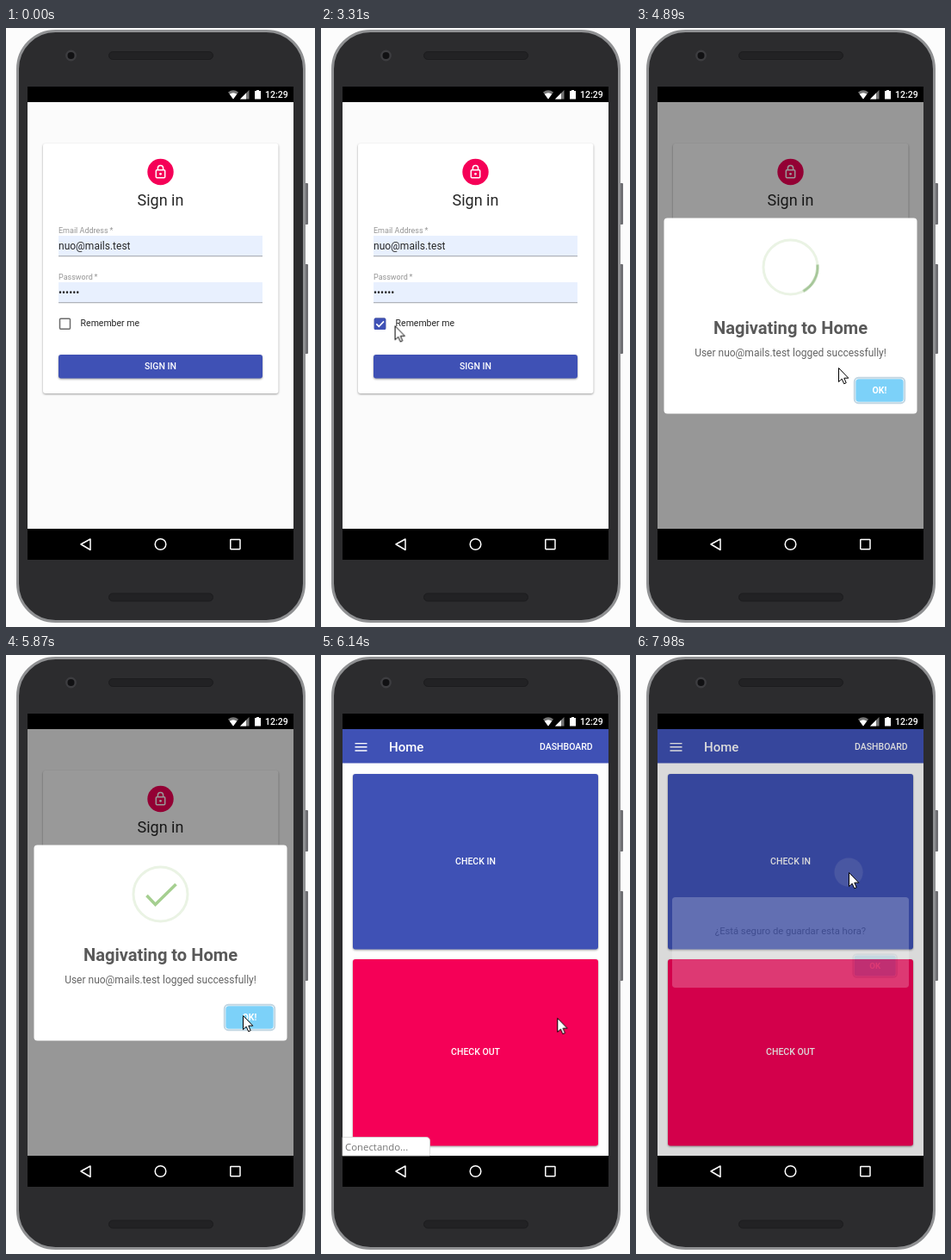
These frames come from a looping animation (359 px wide and 695 px high, 8000 ms). An HTML page:

```html
<!DOCTYPE html>
<html lang="en">
<head>
<meta charset="utf-8">
<title>Sign in flow</title>
<style>
  html, body { margin: 0; width: 100%; height: 100%; overflow: hidden; background: #fcfcfc; }
  svg { display: block; font: 12px Roboto, sans-serif; }
  .mid { text-anchor: middle; }
  .btn { font-size: 10.5px; font-weight: 500; fill: #fff; }
  .label { font-size: 9px; fill: #949494; }
  .field { fill: #e8f0fe; }
  .ink { fill: #262626; }
  .line { fill: none; stroke: #fff; }
  .raised { filter: drop-shadow(0 1px 1.2px rgba(0,0,0,.38)); }
  .dialog { transform-origin: 179.5px 333.5px; }
  #arc { transform-origin: 179.5px 277.5px; }
  .soft { fill: #646464; }
  .ripple { fill: #fff; }
</style>
</head>
<body>
<svg width="359" height="695" viewBox="0 0 359 695">
  <defs>
    <clipPath id="signClip"><rect x="61" y="379" width="237" height="27.5" rx="3"/></clipPath>
    <clipPath id="inClip"><rect x="37" y="138" width="285" height="203.5" rx="3"/></clipPath>
  </defs>

  <!-- phone -->
  <g fill="#6f6f73">
    <rect x="346" y="180" width="5" height="48" rx="1"/>
    <rect x="346" y="274" width="5" height="104" rx="1"/>
  </g>
  <rect x="13.5" y="3.5" width="333" height="685" rx="44" fill="#2c2c2e" stroke="#8f9092" stroke-width="3"/>
  <g fill="#222224" stroke="#1c1c1e">
    <rect x="119.5" y="27.5" width="121" height="9" rx="4.5"/>
    <rect x="119.5" y="656" width="121" height="9" rx="4.5"/>
  </g>
  <circle cx="75.5" cy="32" r="5.2" fill="#111113" stroke="#3d3d40" stroke-width="2.4"/>
  <rect x="25" y="68" width="309" height="549"/>

  <!-- status bar -->
  <g fill="#fff">
    <path d="M258 74.6Q264 70 270 74.6L264 82.5Z" fill="#777"/>
    <path d="M259.8 76.8Q264 73.6 268.2 76.8L264 82.5Z"/>
    <path d="M282.5 72V82.5H272Z" fill="#777"/>
    <path d="M279 75.5V82.5H272Z"/>
    <path d="M289 73H291V72H294V73H296V82.5H289Z"/>
    <text x="301" y="81" font-size="10.5" font-weight="500">12:29</text>
  </g>

  <!-- navigation bar -->
  <g class="line" stroke-width="1.5" stroke-linejoin="round">
    <path d="M87 599L98 593V605.5Z"/>
    <circle cx="179.5" cy="599" r="6.3"/>
    <rect x="260.8" y="593.5" width="11.2" height="11.2" rx=".6"/>
  </g>

  <rect x="25" y="86" width="309" height="495" fill="#fbfbfb"/>

  <g id="login">
    <rect class="raised" x="43" y="134" width="273.5" height="290" rx="3" fill="#fff"/>
    <circle cx="179.5" cy="167" r="15.2" fill="#f50057"/>
    <g class="line" stroke-width="1.5">
      <rect x="174.3" y="164.8" width="10.4" height="9" rx="1"/>
      <path d="M176.4 164.5V162.6A3.1 3.1 0 0 1 182.6 162.6V164.5"/>
    </g>
    <circle cx="179.5" cy="169.3" r="1.4" fill="#fff"/>
    <text class="mid ink" x="179.5" y="206" font-size="18">Sign in</text>

    <text class="label" x="61" y="238.3">Email Address&#8201;*</text>
    <rect class="field" x="61" y="241" width="237" height="23.5"/>
    <rect x="61" y="264.2" width="237" height="1" fill="#a0a3ab"/>
    <text class="ink" x="61" y="257">nuo@mails.test</text>

    <text class="label" x="61" y="292.3">Password&#8201;*</text>
    <rect class="field" x="61" y="295" width="237" height="23.5"/>
    <rect x="61" y="318.2" width="237" height="1" fill="#a0a3ab"/>
    <text class="ink" x="61" y="311">••••••</text>

    <rect x="62.5" y="337.2" width="12" height="12" rx="1" fill="#fff" stroke="#6b6b6b" stroke-width="1.5"/>
    <g id="tick">
      <rect x="61.7" y="336.4" width="13.6" height="13.6" rx="1.5" fill="#3f51b5"/>
      <path class="line" d="M64.3 343.4L67.3 346.4L73 340.4" stroke-width="1.6"/>
    </g>
    <text x="86.6" y="346.3" class="ink" font-size="10.5">Remember me</text>

    <rect class="raised" x="61" y="379" width="237" height="27.5" rx="3" fill="#3f51b5"/>
    <g clip-path="url(#signClip)"><circle id="rippleA" class="ripple" cx="235" cy="394" r="7"/></g>
    <text class="mid btn" x="179.5" y="396.4">SIGN IN</text>
  </g>

  <g id="home">
    <rect x="25" y="86" width="309" height="495" fill="#fefefe"/>
    <rect x="25" y="86" width="309" height="39.5" fill="#3f51b5"/>
    <path class="line" d="M39.5 102.6H53.5M39.5 106.8H53.5M39.5 111H53.5" stroke-width="1.4"/>
    <text x="79" y="112" font-size="15" font-weight="500" fill="#fff">Home</text>
    <text class="btn" x="254" y="110">DASHBOARD</text>
    <rect class="raised" x="37" y="138" width="285" height="203.5" rx="3" fill="#3f51b5"/>
    <rect class="raised" x="37" y="353" width="285" height="216.5" rx="3" fill="#f50057"/>
    <g clip-path="url(#inClip)"><circle id="rippleB" class="ripple" cx="247" cy="252" r="16.5"/></g>
    <text class="mid btn" x="179.5" y="243">CHECK IN</text>
    <text class="mid btn" x="179.5" y="464">CHECK OUT</text>
  </g>

  <rect id="shade" x="25" y="86" width="309" height="495"/>

  <g id="welcome" class="dialog">
    <rect x="32.5" y="220.5" width="294" height="227" rx="4" fill="#fff"/>
    <g fill="none" stroke-width="3">
      <circle cx="179.5" cy="277.5" r="31.5" stroke="#eaf3e4"/>
      <circle id="arc" cx="179.5" cy="277.5" r="31.5" stroke="#a5c698" pathLength="360"/>
      <path id="check" d="M163.5 279L173.5 289.5L197.5 266" stroke="#a5cf90" stroke-width="3.6" pathLength="100"/>
    </g>
    <text class="mid" x="179.5" y="355" font-size="20.1" font-weight="700" fill="#595959">Nagivating to Home</text>
    <text class="mid soft" x="179.5" y="380.5">User nuo@mails.test logged successfully!</text>
    <rect x="253.8" y="405.8" width="58.4" height="29.4" rx="4.5" fill="none" stroke="#c2d6e2" stroke-width="2"/>
    <rect x="255.3" y="407.3" width="55.4" height="26.4" rx="3.5" fill="#7cd1f9"/>
    <text class="mid btn" x="283" y="424.2" style="font-weight:700">OK!</text>
  </g>

  <g id="confirm" class="dialog">
    <rect x="32.5" y="277.5" width="294" height="112" rx="4" fill="#fff"/>
    <text class="mid soft" x="179.5" y="323">¿Está seguro de guardar esta hora?</text>
    <rect x="257.3" y="348" width="54.4" height="28.6" rx="4.5" fill="none" stroke="#c2d6e2" stroke-width="2"/>
    <rect x="258.8" y="349.5" width="51.4" height="25.6" rx="3.5" fill="#7cd1f9"/>
    <text class="mid btn" x="284.5" y="366.3" style="font-weight:700">OK</text>
  </g>

  <g id="status">
    <path d="M25 559.5H122Q126.5 559.5 126.5 564V581H25Z" fill="#fff" stroke="#d4d4d4" stroke-width=".8"/>
    <text x="28" y="575" fill="#757575" style="font:11.4px 'Open Sans',sans-serif">Conectando...</text>
  </g>

  <path id="cursor" d="M.5 .5V16.6L4.2 13.2L6.7 18.8L9.2 17.7L6.8 12.2H11.8Z" fill="#fff" stroke="#000"/>
</svg>

<script>
const LOOP = 8000;
const $ = id => document.getElementById(id);

// steps: [ms, value, easing to the next step]
function play(id, prop, steps) {
  const last = steps[steps.length - 1];
  const all = [[0, steps[0][1]], ...steps, [LOOP, last[1]]];
  $(id).animate(
    all.map(([ms, value, easing = 'linear']) => ({ offset: ms / LOOP, [prop]: value, easing })),
    { duration: LOOP, iterations: Infinity });
}

// visible between two times, with hard edges
function show(id, from, to = LOOP) {
  const steps = [];
  if (from > 0) steps.push([0, 0], [from, 0]);
  steps.push([from, 1], [to, 1]);
  if (to < LOOP) steps.push([to, 0]);
  play(id, 'opacity', steps);
}

const at = (x, y) => `translate(${x}px, ${y}px)`;
const scale = k => `scale(${k})`;
const turn = a => `rotate(${a}deg)`;

play('cursor', 'transform', [
  [1120, at(264, 695)], [1260, at(247, 664)], [1480, at(178, 575)],
  [1680, at(141, 441)], [1800, at(127, 402), 'ease-out'], [1940, at(121, 386)],
  [1960, at(121, 386), 'ease-in-out'], [2280, at(79, 342)],
  [3230, at(79, 342), 'ease-in'], [3520, at(136, 370)], [3740, at(198, 397), 'ease-out'],
  [3890, at(230, 400)], [4010, at(235, 394)],
  [5230, at(235, 394), 'ease-in-out'], [5620, at(275, 418)],
  [6060, at(275, 418), 'ease-in-out'], [6300, at(272, 430)],
  [7090, at(272, 430), 'ease-in-out'], [7530, at(247, 252)]
]);
show('cursor', 1140);

show('login', 0, 5890);
show('home', 5890);
show('status', 5940, 6470);
play('tick', 'opacity', [[2640, 0], [2740, 1]]);

const ripple = (id, x, y, sizes, fades) => {
  $(id).style.transformOrigin = `${x}px ${y}px`;
  play(id, 'transform', sizes.map(([ms, k]) => [ms, scale(k)]));
  play(id, 'opacity', fades);
};
ripple('rippleA', 235, 394, [[4520, 0], [4610, 1], [4900, 20]],
  [[4520, 0], [4540, .1], [4650, .12], [4900, 0]]);
ripple('rippleB', 247, 252, [[7800, 0], [7980, 1], [8000, 1.15]],
  [[7800, 0], [7830, .12], [8000, .12]]);

play('shade', 'opacity', [
  [4600, 0], [4860, .4], [5890, .4], [5990, .26], [6045, 0],
  [7890, 0], [7980, .14], [8000, .18]
]);

play('welcome', 'opacity', [[4600, 0], [4760, 1], [5890, 1], [5990, .28], [6045, 0]]);
play('welcome', 'transform', [
  [4600, scale(.5), 'ease'], [4735, scale(1.05), 'ease'], [4830, scale(.95), 'ease-out'], [4880, scale(1)]
]);
play('confirm', 'opacity', [[7890, 0], [7980, .22], [8000, .32]]);
play('confirm', 'transform', [[7890, scale(.5)], [7980, scale(.932)], [8000, scale(1)]]);

// success icon: a sweeping arc, then the check mark
play('arc', 'transform', [[4810, turn(110)], [4890, turn(-5)], [5110, turn(-60)]]);
play('arc', 'strokeDasharray', [[4810, '0 360'], [4890, '67 360'], [4960, '75 360'], [5110, '0 360']]);
play('arc', 'opacity', [[4810, 0], [4820, 1], [5090, 1], [5110, 0]]);
play('check', 'strokeDasharray', [[5005, '0 200'], [5090, '30 200'], [5230, '100 200']]);
play('check', 'opacity', [[5005, 0], [5015, 1]]);
</script>
</body>
</html>
```
